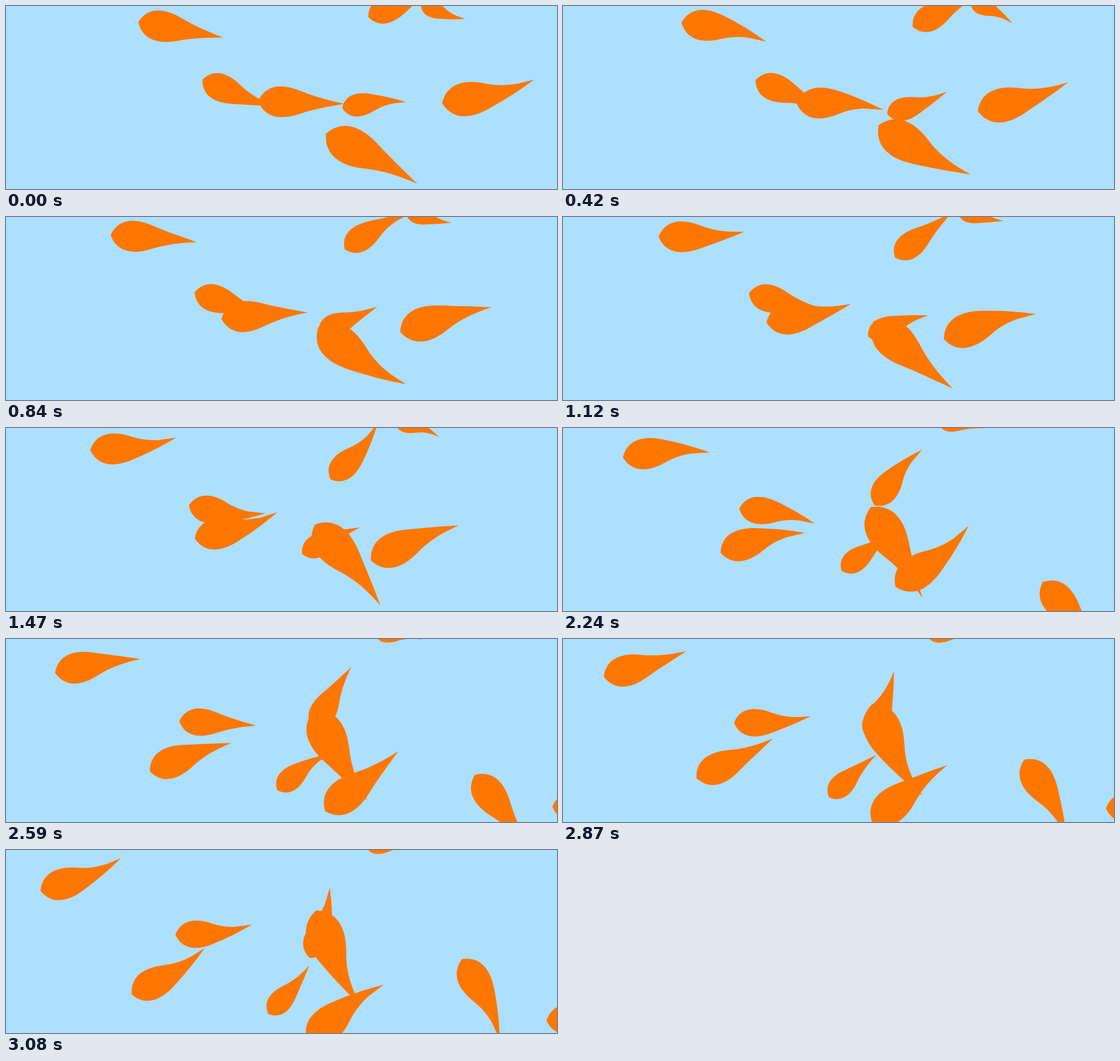
These frames come from a looping animation (900x300 px, 3.15 s). An HTML page with a canvas:

```html
<!DOCTYPE html>
<html lang="en">
<head>
<meta charset="utf-8">
<title>Fish</title>
<style>
  html, body { margin: 0; width: 900px; height: 300px; overflow: hidden; background: #addfff; }
  canvas { display: block; }
</style>
</head>
<body>
<canvas id="pond" width="900" height="300"></canvas>
<script>
const ctx = document.getElementById('pond').getContext('2d');
const LOOP = 3150, STEP = 70;
const BEAT = 3.42;     // tail beat of a full-size fish, radians per second
const WARMUP = 15;     // beats a full-size fish has made before the loop
const SWING = 15;      // sideways reach of the tail tip
const CRUISE = 3.5;    // heading, in degrees, that every fish veers away from
const rad = deg => deg * Math.PI / 180;

// The further a fish has veered from the cruising heading, the faster it turns
const turnRate = (angle, side) => side * (8 + 1.35 * Math.exp(side * (angle - CRUISE) / 15));

const fish = side => (x, y, size, angle, speed) =>
  ({ x, y, size, speed, angle: rad(angle), turn: rad(turnRate(angle, side)) });
const diver = fish(-1);
const climber = fish(1);

// start x, start y, size, heading in degrees, speed in px/s
const school = [
  diver(283, 38.5, 1, 10.5, 53),
  diver(480, 158, 1, 2, 72),
  diver(376, 145, 0.888, 24, 13),
  diver(645, -3, 0.844, -21.5, 60),
  diver(598.5, 158, 0.738, -11, 51),
  diver(786, 147.5, 1.097, -9, 87.5),
  diver(711, 11.5, 0.54, 25, 29),
  diver(1011, 285, 1, 22, 20),
  climber(596, 246, 1.206, 26.5, 31),
  climber(1008, 429, 1.025, 21, 98)
];

// One half of the outline, from the head corner or back to it
function drawShape(w) {
  ctx.beginPath();
  for (const s of [-1, 1]) {
    ctx.moveTo(-68, 0);
    ctx.bezierCurveTo(-56, 29 * s, -28, 29.5 * s, 0, 19 * s);
    ctx.bezierCurveTo(24, 10 * s, 47, 5 * s + w / 3, 73, w);
    ctx.lineTo(-68, 0);
  }
  ctx.fill('nonzero');
}

function drawFish(f, t) {
  // constant speed along a steadily turning heading
  const a = f.angle + f.turn * t;
  const r = f.speed / f.turn;
  ctx.save();
  ctx.translate(
    f.x - r * (Math.sin(a) - Math.sin(f.angle)),
    f.y + r * (Math.cos(a) - Math.cos(f.angle))
  );
  ctx.rotate(a);
  ctx.scale(f.size, f.size);
  // small fish beat their tails faster
  drawShape(SWING * Math.sin((WARMUP * 2 * Math.PI + BEAT * t) / f.size));
  ctx.restore();
}

function draw(ms) {
  const t = Math.floor((ms % LOOP) / STEP) * STEP / 1000;
  ctx.fillStyle = '#addfff';
  ctx.fillRect(0, 0, 900, 300);
  ctx.fillStyle = '#ff7700';
  school.forEach(f => drawFish(f, t));
}

const start = performance.now();
function tick() {
  draw(performance.now() - start);
  requestAnimationFrame(tick);
}
tick();
</script>
</body>
</html>
```
